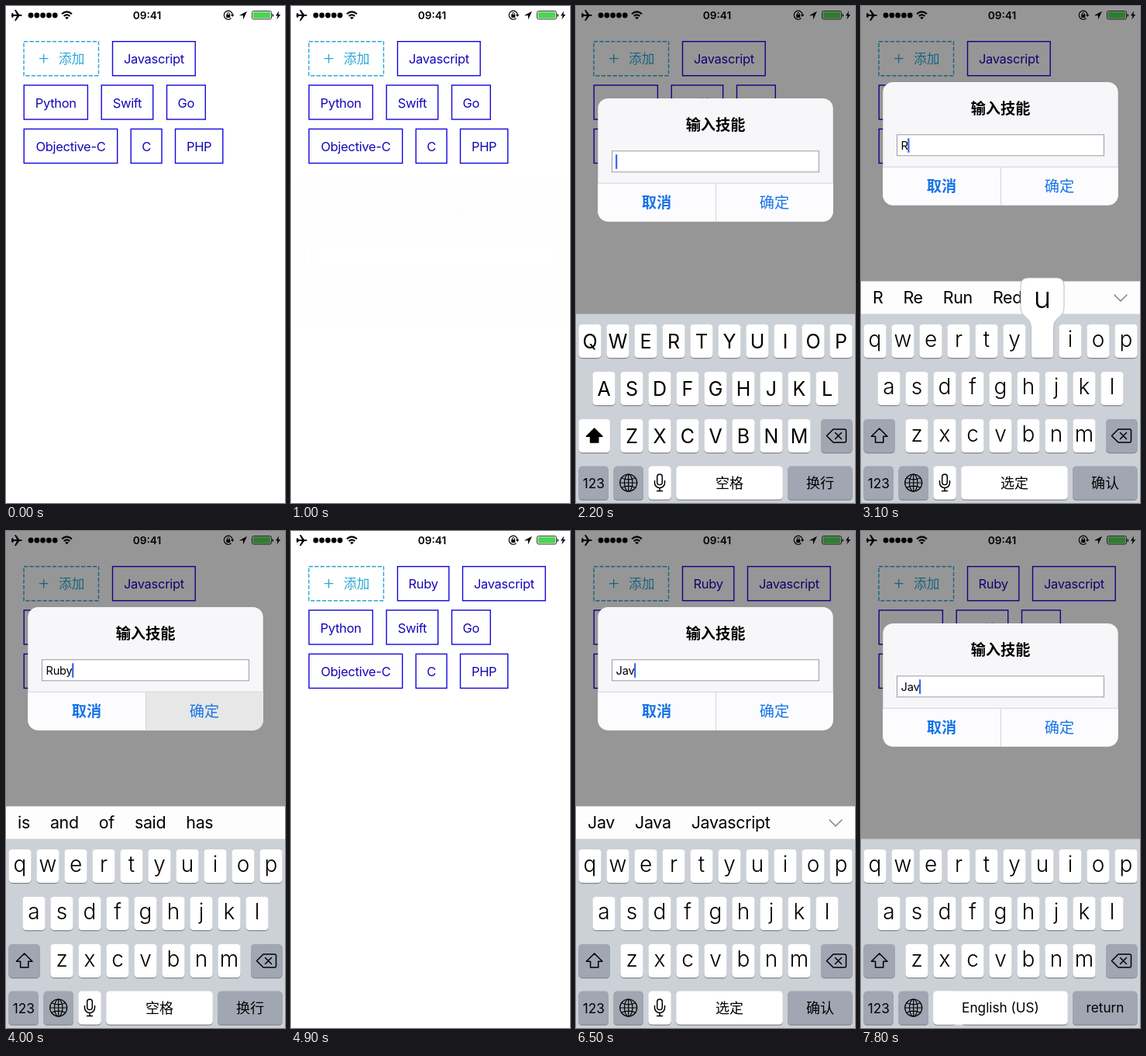
An HTML page for the animation above (8000 ms loop, 360x640 px).

```html
<!DOCTYPE html>
<html lang="zh">
<head>
<meta charset="utf-8">
<title>添加技能</title>
<style>
html, body { margin: 0; width: 100%; height: 100%; overflow: hidden; background: #fff; }
svg { display: block; width: 100vw; height: 100vh; font-family: Inter, "Noto Sans CJK SC", "Noto Sans CJK", sans-serif; }
.tag rect { fill: #fff; stroke: #1407e0; stroke-width: 1.4; }
.tag text { fill: #1807b8; font-size: 16.5px; letter-spacing: -.3px; }
.lower { font-size: 28px; font-weight: 300; }
.upper { font-size: 25px; }
.line { fill: none; stroke: #000; stroke-width: 1.5; stroke-linejoin: round; stroke-linecap: round; }
.mid { text-anchor: middle; }
</style>
</head>
<body>
<svg id="stage" viewBox="0 0 360 640">
  <defs><clipPath id="card"><rect x="28.3" y="119.2" width="303.4" height="158.6" rx="13"/></clipPath></defs>
  <rect width="360" height="640" fill="#fff"/>

  <g id="status">
    <path d="M7 12 7.600 9h1l1.400 2h4L11 5h1.800l4.400 6H20q1.600 1 0 2h-2.800l-4.400 6H11l3-6h-4l-1.400 2h-1z"/>
    <g id="dots"></g>
    <g fill="none" stroke="#000" stroke-width="2.100">
      <path d="M72 10.200q6.500-5.600 13 0M74.600 13q3.900-3.200 7.800 0"/>
    </g>
    <path d="M78.500 17.300 76 14.800q2.500-1.800 5 0z"/>
    <text class="mid" x="182" y="17" font-size="13.700" font-weight="600">09:41</text>
    <path d="M290.500 15.800A5.500 5.500 0 1 1 292.300 11.500" fill="none" stroke="#000" stroke-width="1.200"/>
    <path d="M290 11h4.400l-2.200 3z"/>
    <rect x="284.300" y="11" width="5" height="4" rx=".6"/>
    <path d="M285.400 11.500v-1.600a1.400 1.400 0 0 1 2.800 0v1.600" fill="none" stroke="#000"/>
    <path d="M311 6.800 306 17.500v-5.300h-5.200z"/>
    <rect x="317.500" y="6.500" width="25" height="10.500" rx="2" fill="none" stroke="#333" stroke-width="1"/>
    <rect x="318.800" y="7.800" width="22.400" height="7.900" rx="1" fill="#4cd552"/>
    <path d="M343.600 10v4q1.600-.5 1.600-2t-1.600-2z"/>
    <path d="M352 6.500 348 12.500h2.600L349.300 17.500 354.200 11h-2.700z"/>
  </g>

  <g fill="none" stroke="#2aa7d6">
    <rect x="23" y="45.700" width="96.500" height="44" stroke-width="1.400" stroke-dasharray="5.200 2.200"/>
    <path d="M43 67.700h11.500M48.700 62v11.500" stroke-width="1.300"/>
  </g>
  <text x="68" y="74" font-size="16.700" font-weight="300" fill="#2aa7d6">添加</text>
  <g id="tags"></g>

  <rect id="dim" width="360" height="640"/>

  <g id="alert">
    <g clip-path="url(#card)">
      <rect x="28" y="119" width="304" height="160" fill="#f7f7fa"/>
      <rect x="28" y="228.500" width="304" height="50" fill="#fcfcfe"/>
      <rect id="pressed" x="180.500" y="228.500" width="152" height="50" fill="#e7e7e8"/>
      <path d="M28 228.500h304M180.500 228.500v50" stroke="#d3d3d9" stroke-width="1"/>
    </g>
    <text class="mid" x="180" y="160" font-size="19.200" font-weight="600">输入技能</text>
    <rect x="46.500" y="187" width="267" height="27" fill="#fff" stroke="#9b9ba8" stroke-width="1"/>
    <text id="input" x="51.500" y="206" font-size="14.600" letter-spacing="-.2"></text>
    <rect id="caret" y="191.500" width="2.300" height="18.500" fill="#4068ee"/>
    <g class="mid" font-size="19.200" fill="#1673e8">
      <text x="104" y="260.500" font-weight="600">取消</text>
      <text x="256" y="260.500">确定</text>
    </g>
  </g>

  <g id="keyboard">
    <g id="bar">
      <rect y="354.500" width="360" height="43" fill="#fdfdfe"/>
      <rect id="pick" y="354.500" width="70" height="42" fill="#d5d8de"/>
      <g id="words" font-size="21.400" letter-spacing="-.3"></g>
      <path id="chevron" class="line" d="M327 372l8 8 8-8" style="stroke:#7d828c"/>
    </g>
    <rect y="396.500" width="360" height="250" fill="#ccd0d7"/>
    <g id="keys"></g>
    <g id="lower" class="lower mid"></g>
    <g id="upper" class="upper mid"></g>
    <path id="shift" class="line" d="M23.700 544 34 554.300h-5.200v7.700h-10.200v-7.700h-5.200z"/>
    <path class="line" d="M332 545h14.500q2 0 2 2v13q0 2-2 2H332l-8.500-8.500zM334.500 549.500l8 8m0-8-8 8"/>
    <g class="line" transform="translate(67.700 614)" style="stroke-width:1.200">
      <circle r="11"/><ellipse rx="5.200" ry="11"/>
      <path d="M0-11v22M-11 0h22M-9-6.200q9 4 18 0M-9 6.200q9-4 18 0"/>
    </g>
    <g id="mic" class="line">
      <rect x="104.700" y="603" width="6.600" height="13.500" rx="3.300"/>
      <path d="M101.500 611.500v2.500a6.500 6.500 0 0 0 13 0v-2.500M108 620.500v4M104.500 624.500h7"/>
    </g>
    <text class="mid" x="22.800" y="621" font-size="17.300">123</text>
    <text id="spaceText" class="mid" y="621"></text>
    <text id="returnText" class="mid" x="315" y="621"></text>
    <g id="popup">
      <path fill="#fff" stroke="#a9adb5" stroke-width=".8" d="M-28-50q0-10 10-10h36q10 0 10 10v28c0 14-13.400 12-13.400 26v35q0 4-4 4h-21.200q-4 0-4-4v-35c0-14-13.400-12-13.400-26z"/>
      <text id="popText" class="mid" y="-21" font-size="38" font-weight="300"></text>
    </g>
  </g>
</svg>
<script>
const LOOP = 8000, STEP = 100;
const BAR = 42, KEY_TOP = 396.5, KEY_H = 43;
const WHITE = '#fff', GREY = '#a0a6b2';
const $ = id => document.getElementById(id);

function add(parent, name, attrs, text) {
  const el = document.createElementNS('http://www.w3.org/2000/svg', name);
  set(el, attrs);
  if (text) el.textContent = text;
  return parent.appendChild(el);
}
function set(el, attrs) {
  for (const k in attrs) el.setAttribute(k, attrs[k]);
}
const show = (id, on) => { $(id).style.display = on ? '' : 'none'; };
const within = (t, a, b) => t >= a && t < b;
const ramp = (t, start, len) => Math.min(1, Math.max(0, (t - start) / len));
const ease = p => p * p * (3 - 2 * p);

// Critically damped spring, 0 to 1
function spring(t, start) {
  const x = Math.max(0, t - start) * 0.01826;
  return 1 - (1 + x) * Math.exp(-x);
}

// Status bar
for (let i = 0; i < 5; i++) add($('dots'), 'circle', { cx: 32 + i * 7.8, cy: 12, r: 3.4 });

// Tags
function tag(label, x, y, w) {
  const g = add($('tags'), 'g', { class: 'tag' });
  add(g, 'rect', { x, y, width: w, height: 44 });
  add(g, 'text', { x: x + w / 2, y: y + 28.5, class: 'mid' }, label);
  return g;
}
const ruby = tag('Ruby', 137.5, 45.7, 66.3);
const script = tag('Javascript', 137.5, 45.7, 106.7);
tag('Python', 23.2, 102, 82.2);
tag('Swift', 123.2, 102, 66.5);
tag('Go', 207.5, 102, 49.8);
tag('Objective-C', 23.2, 158.4, 120.5);
tag('C', 161.2, 158.4, 39.8);
tag('PHP', 218.5, 158.4, 61.3);

// Keyboard
function key(x, y, w, fill) {
  add($('keys'), 'rect', { x, y: y + 1.2, width: w, height: KEY_H, rx: 4.6, fill: '#85888e' });
  return add($('keys'), 'rect', { x, y, width: w, height: KEY_H, rx: 4.6, fill });
}
const spots = {};
[['qwertyuiop', 3.4, 410], ['asdfghjkl', 21.4, 471], ['zxcvbnm', 57.4, 532]].forEach(([row, x0, y]) => {
  [...row].forEach((c, i) => {
    const x = x0 + i * 36, cx = x + 14.6;
    key(x, y, 29.2, WHITE);
    add($('lower'), 'text', { x: cx, y: y + 29 }, c);
    add($('upper'), 'text', { x: cx, y: y + 31 }, c.toUpperCase());
    spots[c] = [cx, y];
  });
});
const shiftKey = key(3.4, 532, 40.5, GREY);
key(316, 532, 40.6, GREY);
key(3.4, 592.6, 38.5, GREY);
const globeKey = key(48.5, 592.6, 38.5, GREY);
key(93.3, 592.6, 29.5, WHITE);
const spaceKey = key(129.2, 592.6, 137.6, WHITE);
key(273, 592.6, 83.6, GREY);

const presses = [['R', 2400], ['u', 3100], ['J', 5900], ['a', 6100], ['v', 6300]];
const blinks = [[1400, 1800], [5400, 5800], [6700, 7300]];

// Start time, suggestions
const suggestions = [
  [0, ['R', 'Re', 'Run', 'Red']],
  [3200, ['Ruby', 'Run', 'Rule']],
  [3600, ['is', 'and', 'of', 'said', 'has']],
  [5000, ['J', 'Just', 'Job']],
  [6200, ['Ja', 'Jan', 'Java']],
  [6400, ['Jav', 'Java', 'Javascript']]
];
let shownWords;
function setWords(list) {
  if (list === shownWords) return;
  shownWords = list;
  $('words').textContent = '';
  let x = 15;
  for (const w of list) {
    x += add($('words'), 'text', { x, y: 383 }, w).getComputedTextLength() + 26;
  }
}

function typed(t) {
  if (within(t, 3600, 4900)) return 'Ruby';
  const from = t < 4900 ? 0 : 4900;
  return presses.filter(([, at]) => at >= from && t >= at + 100).map(p => p[0]).join('');
}

function drawAlert(t, shown, hidden, top) {
  const card = $('alert'), text = typed(t);
  const scale = 1.2 - 0.2 * shown;
  card.setAttribute('transform', `translate(180 ${top / 2}) scale(${scale}) translate(-180 -198.5)`);
  card.setAttribute('opacity', shown * (1 - hidden));
  show('pressed', within(t, 4000, 4900));
  $('input').textContent = text;
  let caret = 1;
  for (const [off, on] of blinks) caret += ramp(t, on, 300) - ramp(t, off, 300);
  if (presses.some(([, at]) => within(t, at + 100, at + 600))) caret = 1;
  set($('caret'), { x: 51 + (text ? $('input').getComputedTextLength() : 0), opacity: caret });
}

function drawKeyboard(t, bar, drop) {
  $('keyboard').setAttribute('transform', `translate(0 ${drop})`);
  $('bar').setAttribute('transform', `translate(0 ${BAR * (1 - bar)})`);
  show('bar', bar > 0);

  const caps = within(t, 2000, 2500) || within(t, 5700, 6000);
  const composing = within(t, 2500, 3600) || within(t, 6000, 7800);
  const english = t >= 7800;
  show('upper', caps);
  show('lower', !caps);
  show('chevron', composing);
  show('pick', within(t, 3500, 3600));
  show('mic', !english);
  shiftKey.setAttribute('fill', caps ? WHITE : GREY);
  $('shift').style.fill = caps ? '#000' : 'none';
  globeKey.setAttribute('fill', within(t, 7400, 7600) ? WHITE : GREY);
  set(spaceKey, english ? { x: 93.3, width: 173.5 } : { x: 129.2, width: 137.6 });

  const size = english ? 17.2 : 18;
  set($('spaceText'), { x: english ? 180 : 198, 'font-size': size, y: english ? 619.5 : 621 });
  set($('returnText'), { 'font-size': size, y: english ? 619.5 : 621 });
  $('spaceText').textContent = english ? 'English (US)' : composing ? '选定' : '空格';
  $('returnText').textContent = english ? 'return' : composing ? '确认' : '换行';
  setWords(suggestions.filter(s => t >= s[0]).pop()[1]);

  const hit = presses.find(([, at]) => within(t, at, at + 200));
  show('popup', hit);
  if (hit) {
    $('popup').setAttribute('transform', `translate(${spots[hit[0].toLowerCase()]})`);
    $('popText').textContent = hit[0];
  }
}

function draw(t) {
  const second = t >= 4900;
  const shown = spring(t, second ? 4930 : 995);
  const hidden = second ? 0 : spring(t, 4080);
  const bar = t >= 7800 ? 0 : spring(t, second ? 5980 : 2480);
  const rise = (1 - shown) * 245;

  const moved = ease(ramp(t, 4400, 400));
  ruby.setAttribute('opacity', moved);
  script.setAttribute('transform', `translate(${84 * moved} 0)`);

  $('dim').setAttribute('opacity', 0.41 * shown * (1 - hidden));
  drawAlert(t, shown, hidden, KEY_TOP + rise - BAR * bar);
  drawKeyboard(t, bar, rise + hidden * 288);
}

function tick() {
  draw(Math.floor(performance.now() % LOOP / STEP) * STEP);
  requestAnimationFrame(tick);
}
tick();
</script>
</body>
</html>
```
